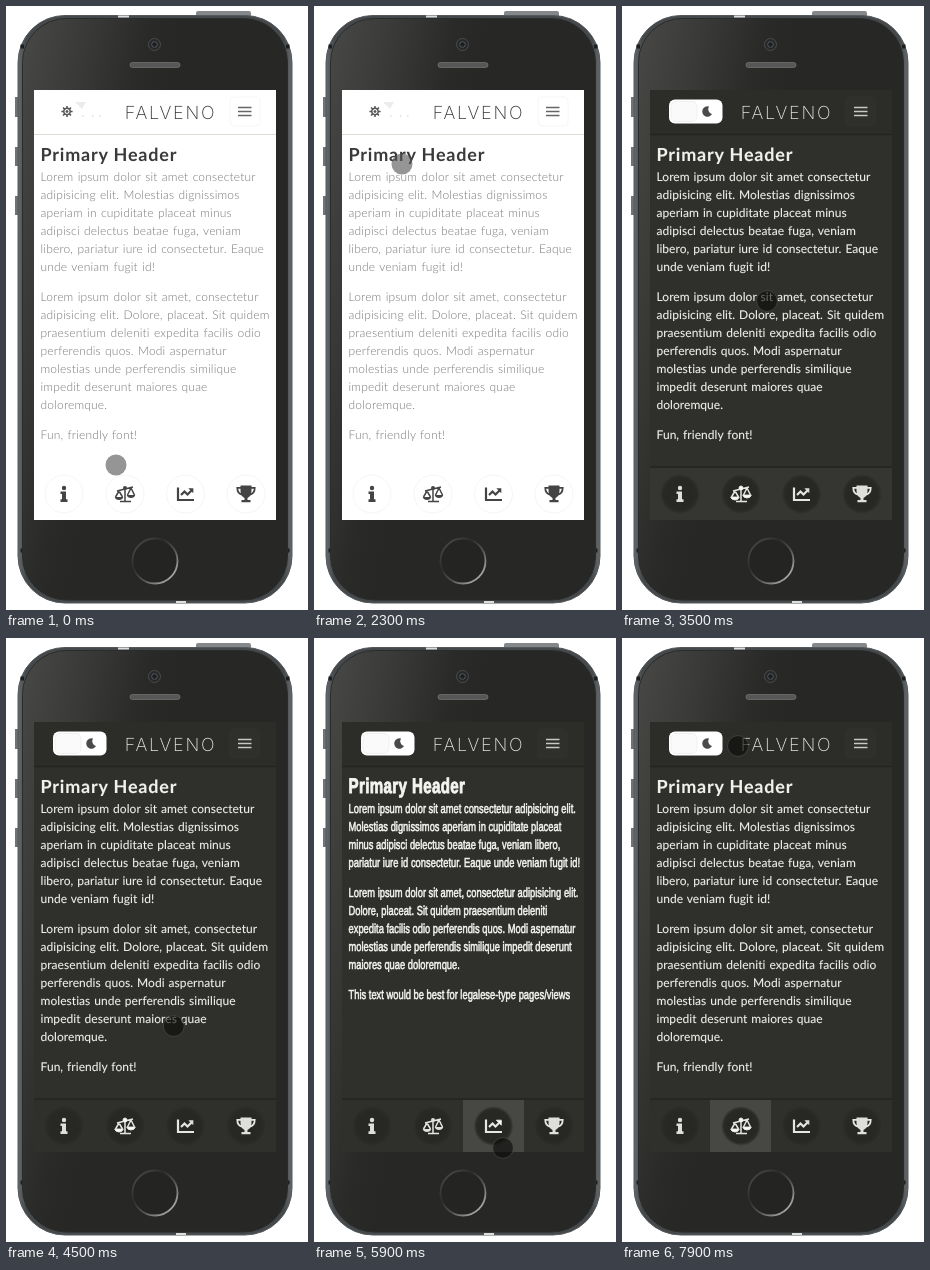
Animation, 302 px wide and 604 px high, one loop 8 s. Source, as an HTML page:

```html
<!DOCTYPE html>
<html lang="en">
<head>
<meta charset="utf-8">
<title>Theme and tab demo</title>
<style>
  html, body { margin: 0; width: 100%; height: 100%; overflow: hidden; background: #fff; }
  svg { display: block; text-rendering: geometricPrecision; }
  .body { font: 12px Lato, sans-serif; letter-spacing: .05px; word-spacing: .8px; }
  .body .head { font-size: 18px; font-weight: 700; letter-spacing: .8px; word-spacing: 0; }
  .light .body { font-weight: 300; letter-spacing: .18px; }
  .light .body .head { letter-spacing: .8px; }
  .legal { font: 13px "Liberation Sans", Arial, sans-serif; }
  .legal .head { font-size: 21px; font-weight: 700; letter-spacing: .5px; stroke-width: 1px; }
  .dark .body { stroke: #f0f0ec; stroke-width: .1px; }
  .dark .legal { stroke: #f4f4f0; stroke-width: .6px; }
  .logo { font: 200 18px Inter, sans-serif; letter-spacing: 1.7px; text-anchor: middle; }
</style>
</head>
<body>
<svg id="stage" width="302" height="604" viewBox="0 0 302 604"></svg>
<script>
const LOOP = 8000, STEP = 100;
const TAB_X = [28, 88, 149, 210, 270], ICON_X = [58, 119, 179.5, 240];

const friendlyLines = [
  'Lorem ipsum dolor sit amet consectetur', 'adipisicing elit. Molestias dignissimos',
  'aperiam in cupiditate placeat minus', 'adipisci delectus beatae fuga, veniam',
  'libero, pariatur iure id consectetur. Eaque', 'unde veniam fugit id!', '',
  'Lorem ipsum dolor sit amet, consectetur', 'adipisicing elit. Dolore, placeat. Sit quidem',
  'praesentium deleniti expedita facilis odio', 'perferendis quos. Modi aspernatur',
  'molestias unde perferendis similique', 'impedit deserunt maiores quae', 'doloremque.', '',
  'Fun, friendly font!'];
const legalLines = [
  'Lorem ipsum dolor sit amet consectetur adipisicing elit.', 'Molestias dignissimos aperiam in cupiditate placeat',
  'minus adipisci delectus beatae fuga, veniam libero,', 'pariatur iure id consectetur. Eaque unde veniam fugit id!', '',
  'Lorem ipsum dolor sit amet, consectetur adipisicing elit.', 'Dolore, placeat. Sit quidem praesentium deleniti',
  'expedita facilis odio perferendis quos. Modi aspernatur', 'molestias unde perferendis similique impedit deserunt',
  'maiores quae doloremque.', '', 'This text would be best for legalese-type pages/views'];

function page(lines, x) {
  let y = 175;
  return `<text class="head" x="${x}" y="154.5">Primary Header</text>` + lines.map(line => {
    const text = line && `<text x="${x}" y="${y}">${line}</text>`;
    y += line ? 18 : 12;
    return text;
  }).join('');
}

// Tab icons, each drawn around its own centre
const icons = [
  '<circle cy="-6" r="2.2"/><path d="M-3.5-2.5H2V5.3H3.5V8H-3.5V5.3H-2V0H-3.5z"/>',
  `<path d="M-8-3 8-7M0-7V7M-5 7.5H6M-6-3-9.5 3M-6-3-2.5 3M6-6 2.5 1M6-6 9.5 1" fill="none" stroke-width="1.5"/>
   <path d="M-10.3 3H-1.7Q-2.5 6-6 6T-10.3 3zM1.7 1h8.6Q9.5 4 6 4T1.7 1z"/><circle cy="-6" r="2"/>`,
  `<path d="M-7.5-6.5V6H8.5M-4.5 1-1-2.5 2 .5 6-3.5" fill="none" stroke-width="2.2"/><path d="M2.8-5.8H7.8V-.8z"/>`,
  `<path d="M-5.5-8.5h11v5.5C5.5 1 3.5 3 1.5 4V6H4.5V8.2h-9V6h3V4C-3.5 3-5.5 1-5.5-3z"/>
   <path d="M-5-6.2H-8.7C-8.7-2.5-7 0-4 .5M5-6.2H8.7C8.7-2.5 7 0 4 .5" fill="none" stroke-width="1.8"/>`];

const icon = (i, color, id = '') =>
  `<g ${id && `id="${id}"`} transform="translate(${ICON_X[i]} 488)" fill="${color}" stroke="${color}" stroke-width="0">${icons[i]}</g>`;

const hamburger = color =>
  `<path d="M232 101.5h13.5M232 105.5h13.5M232 109.5h13.5" stroke="${color}" stroke-width="1.7"/>`;

const logo = color => `<text class="logo" x="164.5" y="112.5" fill="${color}">FALVENO</text>`;

const sunRays = Array.from({ length: 8 }, (_, i) =>
  `<path d="M0-3V-5.6" transform="rotate(${i * 45})"/>`).join('');

const lightScreen = `<g class="light">
  <rect x="28" y="84" width="242" height="430" fill="#fff"/>
  <path d="M28 128.5H270" stroke="#dedcd6"/>
  <g transform="translate(61 105.5)" stroke="#555" stroke-width="1.5" fill="none">
    <circle r="3.2"/><circle r=".7"/>${sunRays}</g>
  <path d="M69 96h11l-4 7z" fill="#ececec"/>
  <path d="M76 110h1.5M86 110h1.5M93 110h1.5" stroke="#ccc"/>
  <rect x="224" y="91" width="30" height="29" rx="4" fill="#fff" stroke="#f6f6f6"/>
  ${logo('#333')}${hamburger('#666')}
  <g class="body" fill="#777">${page(friendlyLines, 34.5).replace('class="head"', 'class="head" fill="#3a3a3a"')}</g>
  ${ICON_X.map((x, i) => `<circle cx="${x}" cy="488" r="19" fill="#fff" stroke="#f5f5f5"/>${icon(i, '#444')}`).join('')}
</g>`;

const darkScreen = `<g id="dark" class="dark">
  <rect x="28" y="84" width="242" height="430" fill="#2f302b"/>
  <rect x="28" y="84" width="242" height="44" fill="#2c2d29"/>
  <path d="M28 128.5H270M28 461H270" stroke="#232420" stroke-width="1.6"/>
  <rect x="47" y="93.5" width="53.5" height="24" rx="6" fill="#fff"/>
  <rect x="49" y="95.5" width="26" height="20" rx="5" fill="#fafafa" stroke="#f0f0f0"/>
  <path d="M87 100.5A5.2 5.2 0 1 0 90 108A5 5 0 0 1 87 100.5z" fill="#4a4a4a"/>
  <rect x="223" y="90" width="31" height="31" rx="5" fill="#2f302c"/>
  ${logo('#e4e4e0')}${hamburger('#c8c8c4')}
  <g id="friendly" class="body" fill="#f0f0ec">${page(friendlyLines, 34.5)}</g>
  <g id="legal" class="legal" fill="#f4f4f0" transform="translate(34.5 0) scale(.72 1)">${page(legalLines, 0)}</g>
  <rect id="nav" x="28" y="462" width="242" height="52" fill="#393a36"/>
  <rect id="tab" y="462" height="52" fill="#474744"/>
  ${ICON_X.map(x => `<circle cx="${x}" cy="488" r="20" fill="url(#dent)"/>`).join('')}
  <rect id="flash" y="462" height="52" rx="2" fill="#72726f"/>
  ${ICON_X.map((_, i) => icon(i, '#e6e6e2', 'icon' + i)).join('')}
</g>`;

const stage = document.getElementById('stage');
stage.innerHTML = `<defs>
  <linearGradient id="face" x2=".5" y2=".22">
    <stop stop-color="#484947"/><stop offset=".4" stop-color="#3a3b39"/><stop offset=".8" stop-color="#2a2b29"/><stop offset="1" stop-color="#272825"/>
  </linearGradient>
  <linearGradient id="rim" x2="1" y2="0">
    <stop stop-color="#66696b"/><stop offset=".03" stop-color="#46494b"/>
    <stop offset=".97" stop-color="#46494b"/><stop offset="1" stop-color="#66696b"/>
  </linearGradient>
  <linearGradient id="ring" x2="1" y2="1">
    <stop stop-color="#555"/><stop offset=".35" stop-color="#2c2c2b"/><stop offset=".6" stop-color="#555"/><stop offset="1" stop-color="#d0d0d0"/>
  </linearGradient>
  <radialGradient id="dent">
    <stop offset=".7" stop-color="#272824"/><stop offset=".85" stop-color="#292a26"/><stop offset="1" stop-color="#292a26" stop-opacity="0"/>
  </radialGradient>
</defs>
<rect x="190" y="5" width="55" height="8" rx="2" fill="#85888a"/>
<path d="M11 91V111M11 141V160M11 190V209" stroke="#707375" stroke-width="4"/>
<rect x="12" y="9.5" width="274" height="587.5" rx="47" fill="url(#rim)" stroke="#55585a"/>
<path d="M14.5 40.5H18M280 40.5H283.5M14.5 544.5H18M280 544.5H283.5" stroke="#1c1e20" stroke-width="4"/>
<path d="M112 10.5H123M170 596H180" stroke="#ddd" stroke-width="2"/>
<rect x="16.5" y="12.5" width="265" height="581.5" rx="44" fill="url(#face)" stroke="#2a2c2b"/>
<circle cx="148.5" cy="38.5" r="6" fill="#272829" stroke="#4b4c4d"/>
<circle cx="148.5" cy="38.5" r="2.8" fill="#1b1d20" stroke="#555a60"/>
<rect x="124" y="56.5" width="50" height="5" rx="2.5" fill="#565756" stroke="#777" stroke-width=".7"/>
<circle cx="149" cy="555" r="22.5" fill="#242523" stroke="url(#ring)" stroke-width="1.8"/>
${lightScreen}${darkScreen}
<g id="cursor"><circle r="10.5"/><circle r="8" opacity=".35" stroke="none"/></g>`;

// Pointer path: time, x, y
const path = [
  [0, 110, 459], [100, 125, 505], [200, 150, 521], [300, 172, 400], [400, 179, 280],
  [1600, 179, 280], [1700, 119, 242], [2000, 98, 190], [2300, 88, 158], [2500, 88, 158],
  [3200, 95, 121], [3300, 98, 119], [3400, 120, 200], [3500, 145, 295], [3800, 150, 308],
  [4100, 150, 308], [5000, 190, 488], [5100, 190, 490], [5600, 189, 505], [5700, 189, 505],
  [5900, 189, 510], [6100, 189, 510], [6900, 135, 499], [7000, 133, 497], [7100, 130, 485],
  [7500, 144, 227], [7600, 144, 227], [7900, 116, 108]];

const get = id => document.getElementById(id);
const set = (id, attributes) => {
  for (const name in attributes) get(id).setAttribute(name, attributes[name]);
};
const clamp = v => Math.max(0, Math.min(1, v));
const progress = (t, from, to) => clamp((t - from) / (to - from));

function pointerAt(t) {
  const next = path.findIndex(p => p[0] >= t);
  if (next < 1) return path[0].slice(1);
  const [a, b] = [path[next - 1], path[next]], k = progress(t, a[0], b[0]);
  return [a[1] + (b[1] - a[1]) * k, a[2] + (b[2] - a[2]) * k];
}

function draw(now) {
  const t = Math.floor(now % LOOP / STEP) * STEP;
  const legal = t >= 5100 && t < 7000, clicked = t >= 5100;
  const active = legal ? 2 : 1;

  set('dark', { opacity: progress(t, 3200, 3500) });
  set('nav', { opacity: .6 * (1 - progress(t, 3500, 3800)) });
  get('friendly').style.display = legal ? 'none' : '';
  get('legal').style.display = legal ? '' : 'none';

  // The clicked tab flashes over its button, then settles behind it
  const start = legal ? 5100 : 7000;
  const box = { x: TAB_X[active], width: TAB_X[active + 1] - TAB_X[active] };
  set('tab', { ...box, opacity: clicked ? 1 : 0 });
  set('flash', { ...box, opacity: clicked ? .95 * (1 - progress(t, start, start + 500)) : 0 });
  icons.forEach((_, i) => set('icon' + i, i === active
    ? { fill: '#fff', 'stroke-width': .9 }
    : { fill: '#dededa', 'stroke-width': 0 }));

  const dark = t > 3300;
  set('cursor', {
    transform: `translate(${pointerAt(t)})`, opacity: .62,
    fill: dark ? '#0c0c0a' : '#555', stroke: dark ? '#4a4b47' : 'none'
  });
  requestAnimationFrame(draw);
}
requestAnimationFrame(draw);
</script>
</body>
</html>
```
